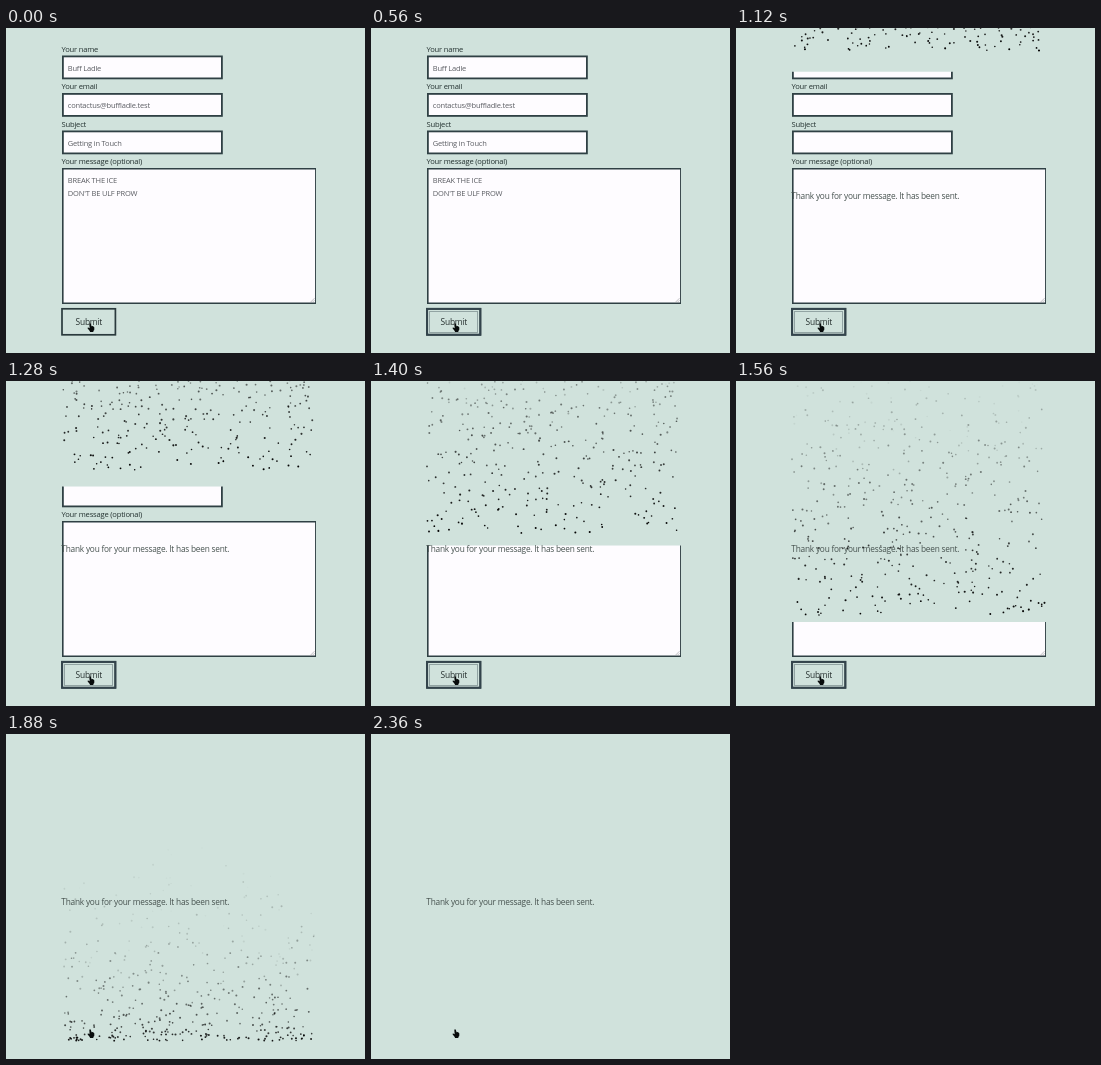
These frames come from a looping animation (359x325 px, 3 s). An HTML page with a canvas:

```html
<!DOCTYPE html>
<html lang="en">
<head>
<meta charset="utf-8">
<title>Contact form</title>
<style>
  html, body { margin: 0; width: 100%; height: 100%; overflow: hidden; background: #d0e2dc; }
  svg, canvas { position: absolute; left: 0; top: 0; width: 359px; height: 325px; }
  text { font-family: "Open Sans", "Noto Sans", sans-serif; letter-spacing: -.026em; }
  .label { font-size: 7.6px; font-weight: 500; fill: #22302f; }
  .value { font-size: 7.5px; fill: #5b5d63; }
  .sent { font-size: 8.3px; fill: #46524f; }
  .submit { font-size: 8.4px; font-weight: 500; fill: #26302f; text-anchor: middle; }
  .field { fill: #fefcff; stroke: #2f4044; stroke-width: 1.8; }
  .area { fill: #fefcff; stroke: #3d4c50; stroke-width: 1; }
  .edge { fill: none; stroke: #2f4044; stroke-width: 1.6; }
  .button { fill: none; stroke: #2a3a3d; stroke-width: 1.7; }
  .focus { fill: none; stroke: #33444c; }
  .grip { stroke: #9a9a9e; stroke-width: .6; }
</style>
</head>
<body>
<svg viewBox="0 0 359 325">
  <clipPath id="clip"><rect id="window" width="359" height="325"/></clipPath>
  <g id="form" clip-path="url(#clip)">
    <text class="label" x="55.5" y="23.8">Your name</text>
    <text class="label" x="55.5" y="61.3">Your email</text>
    <text class="label" x="55.5" y="98.8">Subject</text>
    <text class="label" x="55.5" y="136.3">Your message (optional)</text>
    <rect class="field" x="56.9" y="28.4" width="159" height="22"/>
    <rect class="field" x="56.9" y="65.9" width="159" height="22"/>
    <rect class="field" x="56.9" y="103.4" width="159" height="22"/>
    <rect class="area" x="56.5" y="140.5" width="253" height="135"/>
    <path class="edge" d="M310 140.8H56.8V275.2H310"/>
    <path class="grip" d="M304.5 274.2l4-4M306.5 274.2l2-2"/>
    <g id="values">
      <text class="value" x="61.8" y="42.5">Buff Ladle</text>
      <text class="value" x="61.8" y="80">contactus@buffladle.test</text>
      <text class="value" x="61.8" y="117.5">Getting in Touch</text>
      <text class="value" x="61.8" y="155">BREAK THE ICE</text>
      <text class="value" x="61.8" y="167.5">DON'T BE ULF PROW</text>
    </g>
    <rect class="button" x="56" y="280.8" width="53.4" height="26"/>
    <g id="focus" class="focus">
      <rect x="56.1" y="280.9" width="53.2" height="25.8" stroke-width="2"/>
      <rect x="58.5" y="283.5" width="48" height="21" stroke-width=".8" stroke-dasharray="1 1"/>
    </g>
    <text class="submit" x="82.8" y="297">Submit</text>
  </g>
  <text id="sent" class="sent" x="55.3" y="171.2">Thank you for your message. It has been sent.</text>
</svg>
<canvas id="dust" width="359" height="325"></canvas>
<svg viewBox="0 0 359 325">
  <path fill="#080c0c" transform="translate(8.6 29.8) scale(.9)" d="M83 295.4q1-.8 1.7.2l.8 2.6 1.3-.1 1.2.6.6 1.1-.1 2.6-1 1.2v1.2h-3.7l-.3-1.2-2.3-2.7q-.5-1.2.6-1.2l1.6.8z"/>
</svg>
<script>
const LOOP = 3000, STEP = 40, PRESS = 560, SEND = 920;
const START = 942, SPAN = 910, COUNT = 1000;

const $ = id => document.getElementById(id);
const form = $('form'), values = $('values'), focus = $('focus'), sent = $('sent');
const ctx = $('dust').getContext('2d');

// Mulberry32
let seed = 7331;
function rand(min, max) {
  seed = (seed + 0x6D2B79F5) | 0;
  let n = Math.imul(seed ^ (seed >>> 15), 1 | seed);
  n = (n + Math.imul(n ^ (n >>> 7), 61 | n)) ^ n;
  return min + (max - min) * ((n ^ (n >>> 14)) >>> 0) / 4294967296;
}

// Sine ease in and out over the sweep, from -1 to 1
function sweep(t) {
  const p = Math.min(1, Math.max(0, (t - START) / SPAN));
  return -Math.cos(Math.PI * p);
}

const dots = Array.from({ length: COUNT }, (_, i) => {
  const born = START + i / COUNT * SPAN;
  return {
    born,
    x: rand(56, 309),
    y: 150.5 + 156.5 * sweep(born),
    r: rand(0.75, 1.05),
    life: rand(330, 505),
    rise: rand(0, 0.075),
    sway: rand(-3, 3)
  };
});

function drawDots(t) {
  ctx.clearRect(0, 0, 359, 325);
  for (const d of dots) {
    const age = t - d.born;
    if (age < 0 || age >= d.life) continue;
    const x = d.x + d.sway * Math.sin(age * 0.00377);
    ctx.globalAlpha = 1 - age / d.life;
    ctx.beginPath();
    ctx.arc(Math.min(309, Math.max(56, x)), d.y - d.rise * age, d.r, 0, 7);
    ctx.fill();
  }
}

const show = (el, on) => { el.style.visibility = on ? 'visible' : 'hidden'; };

function render(now) {
  const t = Math.floor(now % LOOP / STEP) * STEP;
  const sweeping = t >= START, gone = t >= START + SPAN;
  show(form, !gone);
  show(values, t < SEND);
  show(focus, t >= PRESS && !gone);
  show(sent, t >= SEND);
  $('window').setAttribute('y', sweeping ? 163 + 146 * sweep(t) : 0);
  drawDots(t);
}

let origin;
function loop(now) {
  origin ??= now;
  render(now - origin);
  requestAnimationFrame(loop);
}
render(0);
requestAnimationFrame(loop);
</script>
</body>
</html>
```
